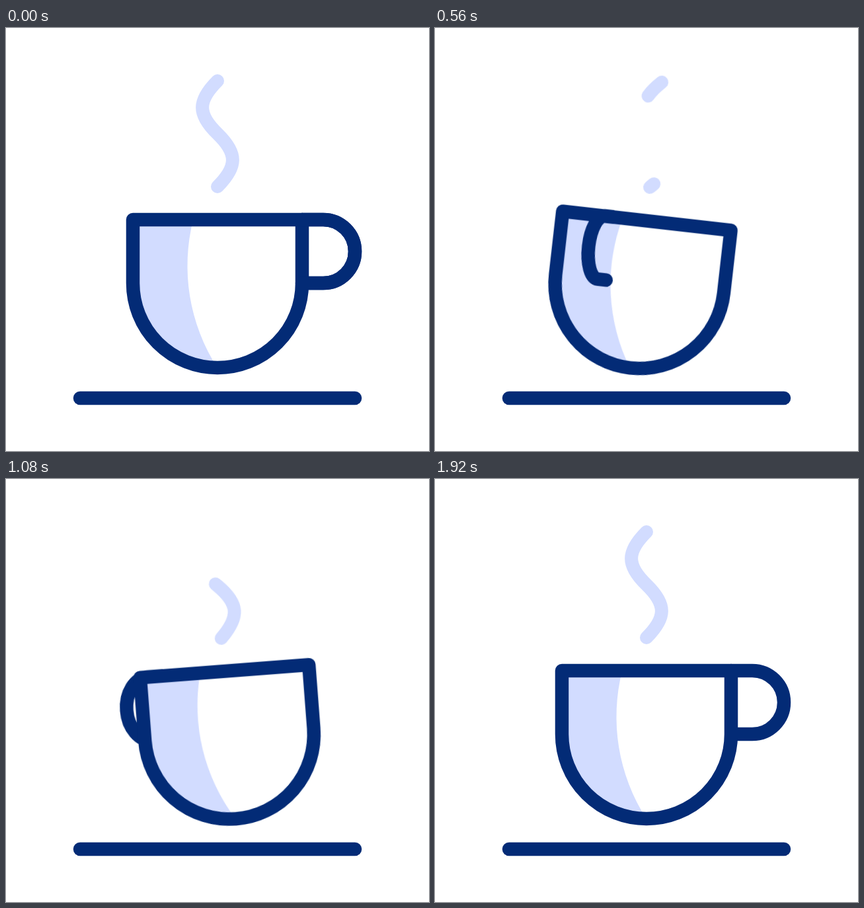
These frames come from a looping animation (640x640 px, 2000 ms). An HTML page:

```html
<!DOCTYPE html>
<html lang="en">
<head>
<meta charset="utf-8">
<title>Rocking cup</title>
<style>
  html, body { margin: 0; width: 100%; height: 100%; overflow: hidden; background: #fff; }
  svg { display: block; width: 100%; height: 100%; }

  :root { --dark: #032b76; --light: #d2dcff; --loop: 2s infinite; --ease: cubic-bezier(.333, 0, .667, 1); }

  .line { fill: none; stroke: var(--dark); stroke-width: 20.5; stroke-linecap: round; stroke-linejoin: round; }
  .steam path { fill: none; stroke: var(--light); stroke-width: 20; stroke-linecap: round; stroke-dasharray: 2 4; }

  .cup { animation: rock var(--loop) var(--ease); }
  .steam { animation: sway var(--loop) var(--ease); }
  .leaving { animation: leave var(--loop) var(--ease); }
  .rising { animation: rise var(--loop) var(--ease); }
  .handle { animation: turn var(--loop) cubic-bezier(.27, 0, .64, 1); }
  .front { animation: front var(--loop) step-end; }

  /* cup origin: centre of its round bottom */
  @keyframes rock {
    0%, 5.5% { transform: translate(320px, 386px) rotate(0deg); }
    20.5% { transform: translate(307px, 387.2px) rotate(7.5deg); }
    68% { transform: translate(346px, 386.4px) rotate(-7.5deg); }
    94%, 100% { transform: translate(320px, 386px) rotate(0deg); }
  }

  /* steam origin: its lower end */
  @keyframes sway {
    0%, 5.5% { transform: translate(320px, 240px) rotate(0deg); }
    20.5% { transform: translate(325px, 241px) rotate(7.5deg); }
    68% { transform: translate(326px, 241px) rotate(-7.5deg); }
    94%, 100% { transform: translate(320px, 240px) rotate(0deg); }
  }

  @keyframes leave {
    0%, 4% { stroke-dashoffset: 0; }
    36% { stroke-dashoffset: -1; }
    36.01%, 100% { stroke-dashoffset: -1.2; }
  }

  @keyframes rise {
    0%, 19.99% { stroke-dashoffset: 2.2; }
    20% { stroke-dashoffset: 2; }
    86.5%, 100% { stroke-dashoffset: 1; }
  }

  /* the handle swings round the cup: mirrored halfway */
  @keyframes turn {
    0%, 4%, 96%, 100% {
      d: path("M128 -96 L160 -96 C186.5 -96 208 -74.5 208 -48 C208 -21.5 186.5 0 160 0 L128 0");
    }
    43.5% {
      d: path("M-128 -96 L-160 -96 C-186.5 -96 -208 -74.5 -208 -48 C-208 -21.5 -186.5 0 -160 0 L-128 0");
    }
  }

  @keyframes front {
    0% { visibility: visible; }
    43.5%, 100% { visibility: hidden; }
  }
</style>
</head>
<body>
<svg viewBox="0 0 640 640">
  <defs>
    <path id="wisp" pathLength="1" d="M0 0 C30 -30 31 -50 0 -80 S-30 -130 0 -160"/>
  </defs>

  <g class="steam">
    <path class="leaving" pathLength="1" d="M0 0 C30 -30 31 -50 0 -80 S-30 -130 0 -160"/>
    <path class="rising" pathLength="1" d="M0 0 C30 -30 31 -50 0 -80 S-30 -130 0 -160"/>
  </g>

  <path class="line" d="M112 560 H528"/>

  <g class="cup">
    <path class="line handle" d="M128 -96 L160 -96 C186.5 -96 208 -74.5 208 -48 C208 -21.5 186.5 0 160 0 L128 0"/>
    <path fill="#fff" d="M-128 -96 H128 V0 A128 128 0 0 1 -128 0 Z"/>
    <path fill="var(--light)" d="M-128 -96 H-36.8 A285 285 0 0 0 -.3 128 A128 128 0 0 1 -128 0 Z"/>
    <path class="line" d="M-128 -96 H128 V0 A128 128 0 0 1 -128 0 Z"/>
    <g class="front">
      <path class="line handle" d="M128 -96 L160 -96 C186.5 -96 208 -74.5 208 -48 C208 -21.5 186.5 0 160 0 L128 0"/>
    </g>
  </g>
</svg>
</body>
</html>
```
